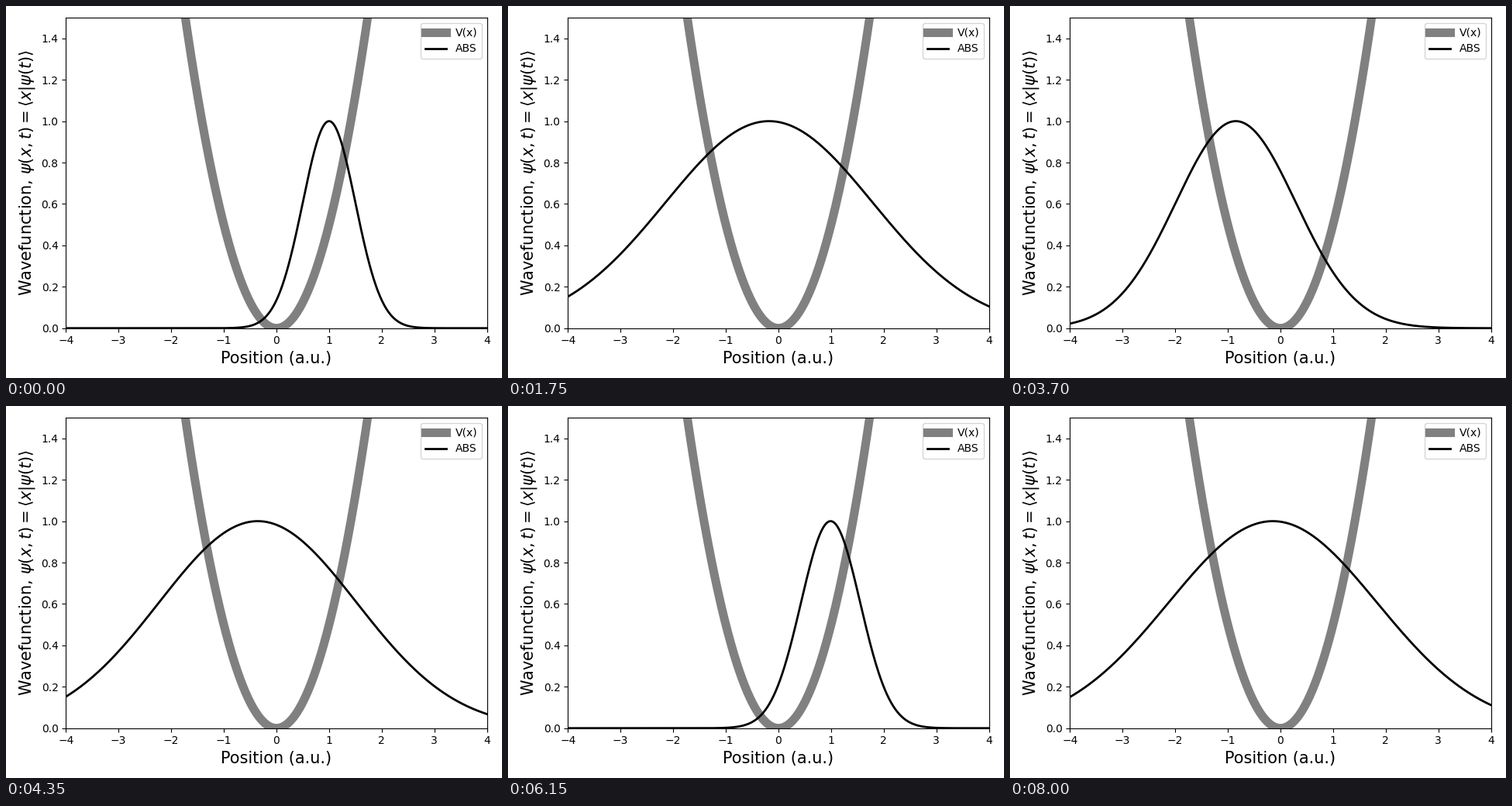
A matplotlib script for the animation above (8.05 s loop, 640 px wide and 480 px high).

```python
import numpy as np
import matplotlib.pyplot as plt
from matplotlib.animation import FuncAnimation

FRAMES = 161
INTERVAL = 50      # ms
DT = 0.05          # atomic time units per frame
X0 = 1.0           # initial displacement
A0 = 2.0           # initial width parameter, |psi| = exp(-A0 (x - X0)^2)

x = np.linspace(-4, 4, 801)


def potential(x):
    return 0.5 * x**2


def packet(t):
    """Modulus of a squeezed Gaussian in a unit-frequency harmonic well."""
    center = X0 * np.cos(t)
    a = A0 / (np.cos(t)**2 + (2 * A0 * np.sin(t))**2)
    return np.exp(-a * (x - center)**2)


fig, ax = plt.subplots(figsize=(6.4, 4.8), dpi=100)
ax.plot(x, potential(x), color="gray", lw=8, label="V(x)")
line, = ax.plot(x, packet(0), color="black", lw=2, label="ABS")
ax.set_xlim(-4, 4)
ax.set_ylim(0, 1.5)
ax.set_xlabel("Position (a.u.)", fontsize=15)
ax.set_ylabel(r"Wavefunction, $\psi(x,t) = \langle x|\psi(t)\rangle$", fontsize=15)
ax.legend(loc="upper right")
fig.tight_layout()


def update(i):
    line.set_ydata(packet(i * DT))
    return line,


anim = FuncAnimation(fig, update, frames=FRAMES, interval=INTERVAL,
                     repeat=True, repeat_delay=0)
plt.show()
```
